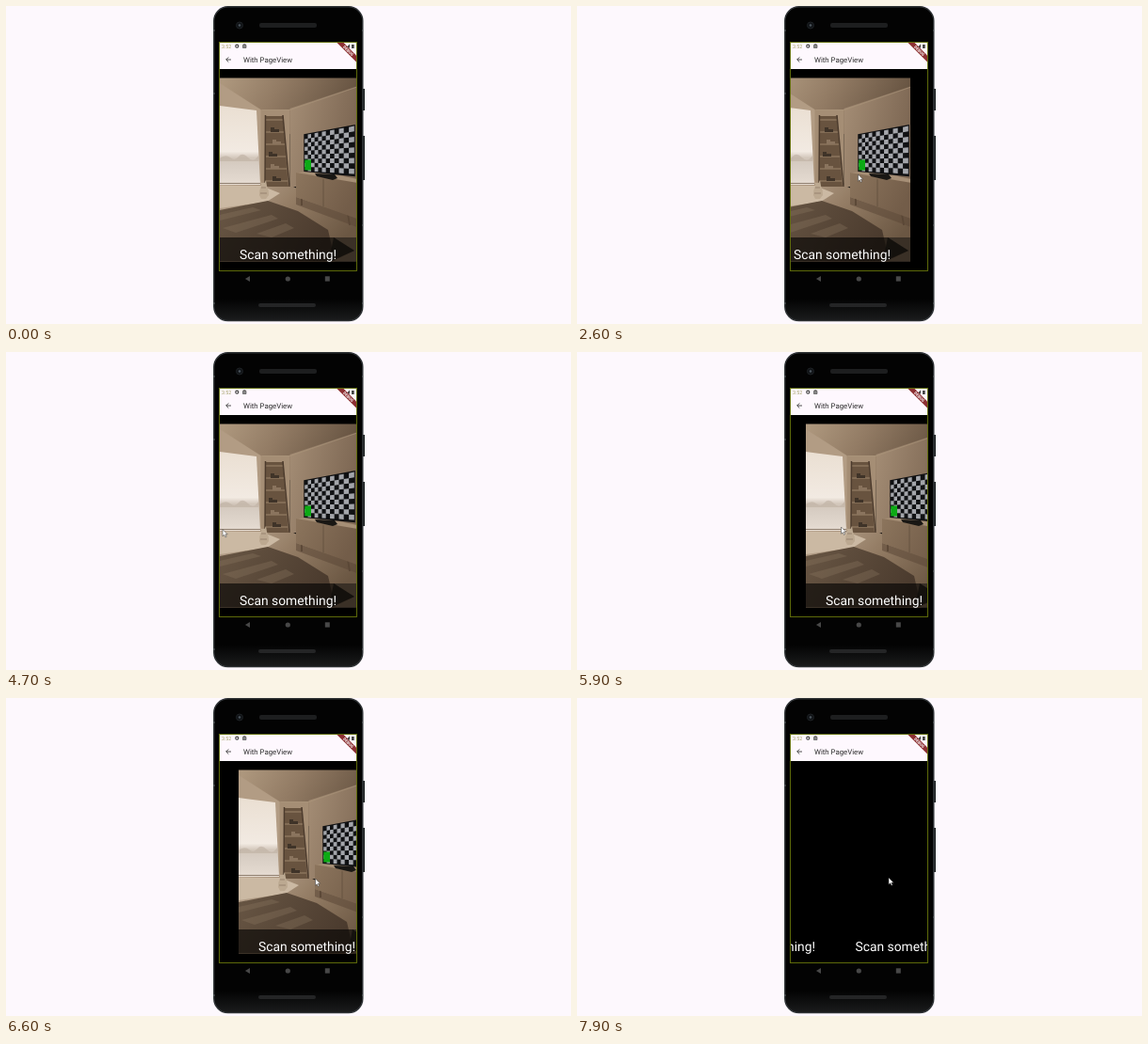
Recreate the animation shown at these times as an HTML page. Size 600x338 px, loop 8000 ms.

```html
<!DOCTYPE html>
<html lang="en">
<head>
<meta charset="utf-8">
<title>Page view scanner</title>
<style>
  html, body { margin: 0; width: 100%; height: 100%; overflow: hidden; background: #fdf8fd; }
  svg { display: block; width: 100vw; height: 100vh; }
  text { font-family: Roboto, "Liberation Sans", sans-serif; text-rendering: geometricPrecision; }
</style>
</head>
<body>
<svg viewBox="0 0 600 338">
  <defs>
    <linearGradient id="ceiling" x2="1" y2=".25">
      <stop stop-color="#b09a80"/><stop offset=".45" stop-color="#927b64"/><stop offset="1" stop-color="#655240"/>
    </linearGradient>
    <linearGradient id="wall" x2="1" y2=".3">
      <stop stop-color="#a58e76"/><stop offset="1" stop-color="#7d6753"/>
    </linearGradient>
    <linearGradient id="sky" x2="0" y2="1">
      <stop stop-color="#eadfd2"/><stop offset=".58" stop-color="#f2eae2"/>
      <stop offset=".66" stop-color="#d2c6ba"/><stop offset=".76" stop-color="#d8cec4"/><stop offset="1" stop-color="#e6dcd2"/>
    </linearGradient>
    <linearGradient id="floor" x2="1" y2=".5">
      <stop stop-color="#bda994"/><stop offset=".5" stop-color="#947d65"/><stop offset="1" stop-color="#6b5743"/>
    </linearGradient>
    <linearGradient id="rug" x2="1" y2=".3">
      <stop stop-color="#685644"/><stop offset="1" stop-color="#4b3b2e"/>
    </linearGradient>
    <linearGradient id="front" x2="1" y2=".4">
      <stop stop-color="#8c755d"/><stop offset="1" stop-color="#735d49"/>
    </linearGradient>
    <linearGradient id="body" x2="0" y2="1">
      <stop offset=".93" stop-color="#030303"/><stop offset="1" stop-color="#1b1c1d"/>
    </linearGradient>
    <clipPath id="screen"><rect x="227" y="67" width="145" height="214"/></clipPath>
    <clipPath id="view"><rect x="227" y="76.500" width="145" height="195"/></clipPath>
    <clipPath id="corner"><rect x="227" y="39" width="145" height="28"/></clipPath>
  </defs>

  <!-- phone -->
  <path d="M378.500 88h2.500v23h-2.500zM378.500 138h2.500v47h-2.500z" fill="#25282a"/>
  <rect x="220.800" y=".800" width="158" height="333.800" rx="15" fill="url(#body)" stroke="#303437" stroke-width="1.400"/>
  <path d="M220 26h2M378 26h1.500M220 93h2M378 233h1.500M220 316h2M378 316h1.500" stroke="#777b7e" stroke-width=".7"/>
  <circle cx="248" cy="20.500" r="3.500" fill="#101316" stroke="#1d2124"/>
  <circle cx="248" cy="20.500" r="1.300" fill="#4a535c"/>
  <rect x="269" y="18" width="61" height="5" rx="2" fill="#1d1e1f"/>
  <rect x="268" y="316" width="61" height="4" rx="2" fill="#242526"/>
  <g fill="#484848">
    <path d="M254 290l5-3v6z"/><circle cx="299.300" cy="290" r="2.600"/><rect x="338.800" y="287.300" width="5" height="5.300"/>
  </g>

  <!-- pages -->
  <rect x="227" y="67" width="145" height="214"/>
  <g clip-path="url(#screen)">
    <g id="pages">
      <g id="room" clip-path="url(#view)">
        <path d="M227 76h146v60H227z" fill="url(#ceiling)"/>
        <path d="M227 82l45 29v84h-45z" fill="#b29c84"/>
        <path d="M227 106l39 5 4 79h-43z" fill="url(#sky)"/>
        <path d="M227 162q6-5 11-1t9-1 10 1 11-2v6h-41z" fill="#c0b2a5" opacity=".65"/>
        <path d="M270.500 110l31 0v86h-31z" fill="#a58e75"/>
        <path d="M301.500 109l72-24v109l-72-2z" fill="url(#wall)"/>
        <path d="M272 110.500h29.500L373 86" fill="none" stroke="#ad977d" stroke-width=".6"/>
        <path d="M227 190h74l72 35v48H227z" fill="url(#floor)"/>
        <path d="M227 191h44l20 8-14 9-50 7z" fill="#cbb9a3"/>
        <path d="M227 188.500h43" stroke="#8f7e6e"/>
        <path d="M227 217l51-10 32 11 32 20 8 35H227z" fill="url(#rug)"/>
        <path d="M227 222l35-8 9 3-44 11zM230 236l52-14 7 4-45 15zM266 242l31-11 9 5-24 10z" fill="#8f7a64" opacity=".3"/>
        <path d="M276 117h18l6 75h-25z" fill="#68533f"/>
        <g id="shelves"></g>
        <path d="M275.500 116l-.5 76M294 116l7 76" stroke="#4c3b2d" stroke-width="1.500"/>
        <path d="M308 203l65 22v10l-65-24z" fill="#5b4837" opacity=".55"/>
        <path d="M314 204v8M363 221l2 12" stroke="#5a4736" stroke-width="1.800"/>
        <path d="M308 177l22-2 43 9v42l-65-23z" fill="url(#front)"/>
        <path d="M308 177l22-2 43 9v4z" fill="#a68f76"/>
        <path d="M337 184v29" stroke="#5e4c3b" stroke-width=".7"/>
        <path d="M328 178l21 1 3 4-5 2-17-4z" fill="#191714"/>
        <path d="M316.300 136.300l54.500-10.300v55.200l-54.500-5.200z" fill="#101113"/>
        <g id="checks"></g>
        <rect x="317.300" y="163.500" width="6.700" height="11" fill="#0caa14"/>
        <path d="M270 185l1.500 3h3l1.500-3 1 6q2 4 2 10l-3 4h-5l-2-4q0-6 2-10z" fill="#bca991"/>
        <path d="M271 193h5M270 199h7" stroke="#89745f" stroke-width=".7"/>
        <path d="M227 246h146v27H227z" fill="#000" opacity=".62"/>
        <path d="M348 246l22 14-25 12h28v-26z" fill="#64564a" opacity=".28"/>
        <path d="M348 246l22 14-27 12z" fill="#080706" opacity=".6"/>
      </g>
      <g id="labels" fill="#fff" font-size="13.85" text-anchor="middle"></g>
    </g>
  </g>

  <!-- app bar -->
  <rect x="227" y="39" width="145" height="28" fill="#fef8fe"/>
  <text x="229" y="44.800" font-size="5.300" fill="#a3a067">3:52</text>
  <circle cx="245.300" cy="42.700" r="1.500" fill="none" stroke="#444" stroke-width="1.200"/>
  <path d="M251.500 41.500h3.500v3h-3.500zM252 40.500h2.500" fill="#888" stroke="#555" stroke-width=".7"/>
  <path d="M361 44.500l4-4v4zM367 41h2.700v4H367z" fill="#444"/>
  <path d="M239 57h-5.200M236.300 54.400l-2.600 2.600 2.600 2.600" fill="none" stroke="#222" stroke-width=".8"/>
  <text x="252" y="59.500" font-size="7.800" fill="#2c2c2c">With PageView</text>
  <g clip-path="url(#corner)">
    <g transform="translate(363.500 47.500) rotate(45)">
      <rect x="-18" y="-2.500" width="36" height="5" fill="#8d3033"/>
      <text y="1.500" font-size="4.200" font-weight="700" fill="#fff" text-anchor="middle">DEBUG</text>
    </g>
  </g>
  <rect x="226.500" y="38.500" width="146" height="243" fill="none" stroke="#68760c" stroke-width=".9"/>

  <path id="cursor" d="M0 0v7.200l1.700-1.500 1.200 2.600 1.200-.6-1.200-2.500h2.300z" fill="#fff" stroke="#333" stroke-width=".5"/>
</svg>
<script>
  const $ = id => document.getElementById(id);
  const LOOP = 8000, STEP = 100, PAGE = 145.5;

  const add = (parent, tag, attrs, text = "") => {
    const el = document.createElementNS("http://www.w3.org/2000/svg", tag);
    for (const key in attrs) el.setAttribute(key, attrs[key]);
    el.textContent = text;
    parent.append(el);
  };

  for (const side of [-1, 0, 1])
    add($("labels"), "text", { x: 299.5 + side * PAGE, y: 268.5 }, "Scan something!");

  for (let i = 0; i < 6; i++) {
    const y = 121 + i * 13, right = 294 + i;
    add($("shelves"), "path", { d: `M276 ${y}H${right}`, stroke: "#9c866d", "stroke-width": 1.1 });
    if (i) add($("shelves"), "path", {
      d: `M${279 + i % 3 * 2} ${y}v-5h4v2h5v3z`, fill: i % 2 ? "#3f3328" : "#8a745e"
    });
  }

  // Checkerboard in perspective: columns and rows widen towards the nearer right edge.
  const COLS = 12, ROWS = 9, LEFT = 38, RIGHT = 51;
  const corner = (col, row) => {
    const s = col / COLS;
    const u = s * LEFT / ((1 - s) * RIGHT + s * LEFT);
    return `${317.2 + 52.6 * u} ${137.2 - 9.6 * u + (LEFT + (RIGHT - LEFT) * u) * row / ROWS}`;
  };
  let cells = "";
  for (let c = 0; c < COLS; c++)
    for (let r = (c + 1) % 2; r < ROWS; r += 2)
      cells += `M${corner(c, r)}L${corner(c + 1, r)}L${corner(c + 1, r + 1)}L${corner(c, r + 1)}z`;
  add($("checks"), "path", { d: cells, fill: "#a3a5aa" });

  // Tracks hold [time, ...values] with straight runs between them.
  const scroll = [
    [0, 0], [2300, 0], [2600, -18], [2800, -60], [3000, -118], [3200, -142], [3300, -PAGE], [3300, 0],
    [5500, 0], [5900, 16], [6100, 0], [6300, 0], [6600, 20], [6800, 62], [7000, 113], [7200, 138],
    [7400, PAGE], [7400, 0], [7500, 0], [7900, 47.5]
  ];
  const pointer = [
    [1000, 319, 161], [2200, 319, 161], [2600, 298.5, 179], [2800, 255, 186], [3000, 213.5, 188],
    [4200, 213.5, 188], [5000, 240, 189], [5500, 258, 186], [5900, 280.5, 186], [6200, 302, 190],
    [6600, 328.5, 192], [6800, 352, 192], [7000, 352, 192], [7300, 276, 192], [7500, 276, 192], [7900, 331, 191]
  ];

  const sample = (track, t) => {
    const next = track.findIndex(key => key[0] > t);
    if (next < 0) return track.at(-1).slice(1);
    if (next === 0) return track[0].slice(1);
    const a = track[next - 1], b = track[next], k = (t - a[0]) / (b[0] - a[0]);
    return a.slice(1).map((v, i) => v + (b[i + 1] - v) * k);
  };

  const draw = now => {
    const t = Math.floor(now % LOOP / STEP) * STEP;
    const [offset] = sample(scroll, t);
    const [x, y] = sample(pointer, t);
    const live = t < 3300 || (t >= 4200 && t < 7400);
    $("pages").setAttribute("transform", `translate(${offset})`);
    $("room").style.display = live && Math.abs(offset) < PAGE / 2 ? "" : "none";
    $("cursor").setAttribute("transform", `translate(${x} ${y})`);
    $("cursor").style.display = t < 1000 ? "none" : "";
  };

  const start = performance.now();
  const tick = () => {
    draw(performance.now() - start);
    requestAnimationFrame(tick);
  };
  tick();
</script>
</body>
</html>
```
